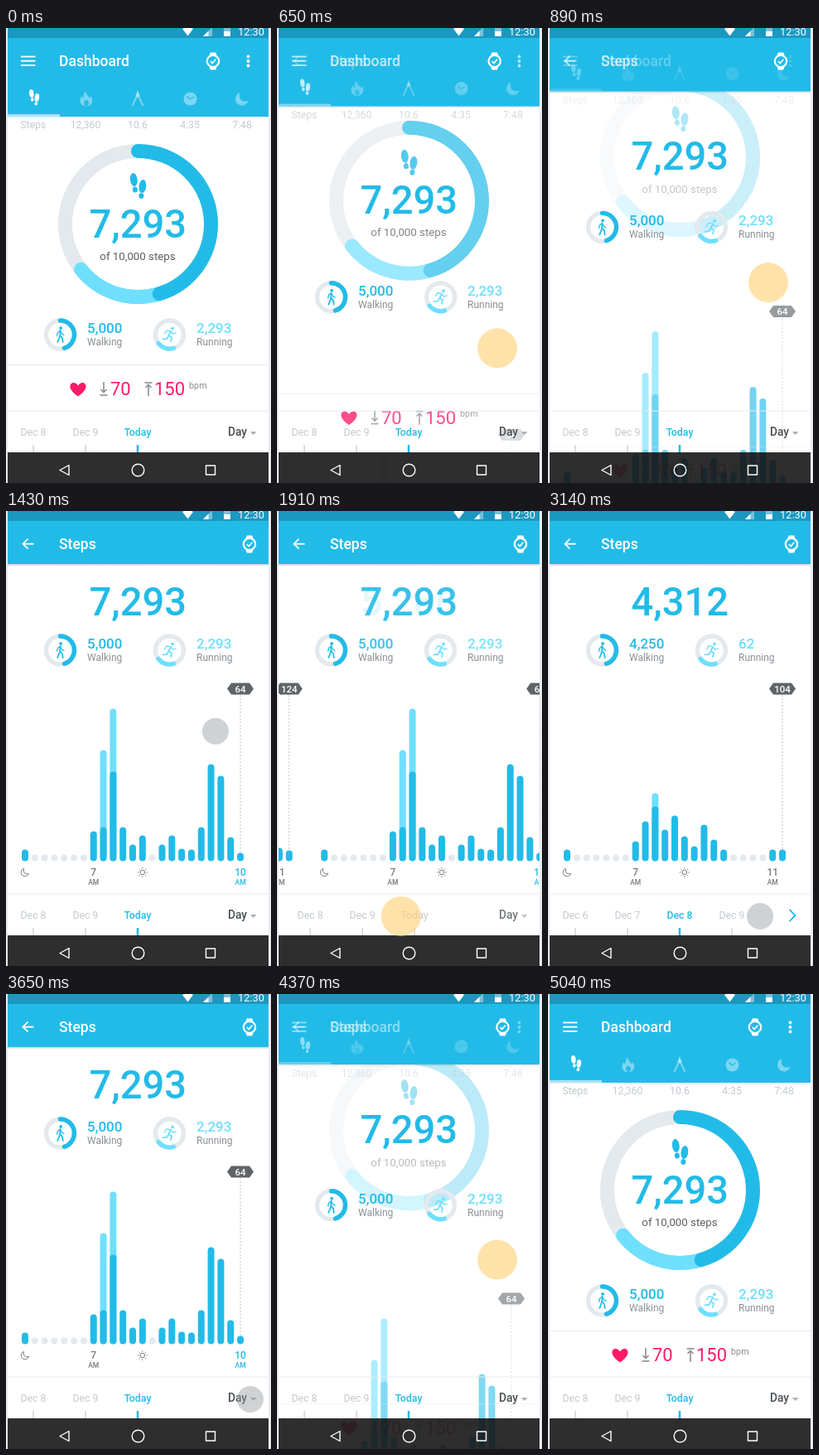
These frames come from a looping animation (320x549 px, 5600 ms). An HTML page with a canvas:

```html
<!DOCTYPE html>
<html lang="en">
<head>
<meta charset="utf-8">
<title>Step tracker</title>
<style>
html, body { margin: 0; width: 100%; height: 100%; overflow: hidden; background: #e9ecf0; }
canvas { display: block; width: 320px; height: 549px; }
</style>
</head>
<body>
<canvas id="stage"></canvas>
<script>
const W = 320, H = 549, LOOP = 5600;
const BLUE = '#22bbe8', LIGHT = '#6fdffe', TRACK = '#e4e9ee', GREY = '#c4c9cf', TEXT = '#5a5f64', PINK = '#ff1a66';
const canvas = document.getElementById('stage');
const c = canvas.getContext('2d');
const dpr = window.devicePixelRatio || 1;
canvas.width = W * dpr;
canvas.height = H * dpr;

// Timelines: time, value, time, value ...
const OPEN = [522, 0, 1097, 1, 4124, 1, 4699, 0];
const HEAD = [485, 0, 1060, 1, 4090, 1, 4665, 0];
const DAYS_BACK = [1879, 0, 2446, 2, 3290, 2, 3640, 0];
const TOUCH_X = [1400, 266, 1690, 144, 1879, 144, 2446, 246, 3110, 246, 3260, 295, 3920, 295, 4090, 266];
const TOUCH_Y = [522, 429, 1097, 239, 1400, 239, 1690, 489, 3920, 489, 4090, 239, 4124, 239, 4699, 429];
const PRESS = [400, 0, 500, 1, 1010, 1, 1100, 0, 1640, 0, 1740, 1, 2450, 1, 2510, 0,
  3240, 0, 3320, 1, 3560, 1, 3650, 0, 4050, 0, 4130, 1, 4700, 1, 4800, 0];
const TOUCH_FADE = [130, 0, 300, 1, 4800, 1, 5040, 0];

// Bar heights per day, 0 is a dot; "extra" is the full height with the light part.
const DAYS = [
  { steps: '7,293', walk: '5,000', run: '2,293', peak: '64', hour: '10', hourBar: 22, extra: { 8: 134, 9: 184 },
    bars: [14, 0, 0, 0, 0, 0, 0, 36, 41, 108, 41, 20, 31, 0, 20, 31, 15, 14, 41, 117, 103, 29, 10] },
  { steps: '5,286', walk: '5,250', run: '36', peak: '124', hour: '11', hourBar: 21, extra: { 8: 72 },
    bars: [14, 14, 0, 0, 0, 0, 0, 28, 60, 80, 59, 41, 67, 33, 12, 16, 51, 14, 72, 40, 25, 16, 13] },
  { steps: '4,312', walk: '4,250', run: '62', peak: '104', hour: '11', hourBar: 21, extra: { 9: 82 },
    bars: [14, 0, 0, 0, 0, 0, 0, 24, 48, 66, 38, 55, 30, 18, 44, 26, 14, 0, 0, 0, 0, 14, 14] }
];
const DATES = ['Today', 'Dec 9', 'Dec 8', 'Dec 7', 'Dec 6'];

const clamp = v => Math.max(0, Math.min(1, v));
const mix = (a, b, k) => a + (b - a) * k;

function track(t, k) {
  if (t <= k[0]) return k[1];
  for (let i = 2; i < k.length; i += 2) {
    if (t < k[i]) return mix(k[i - 1], k[i + 1], (t - k[i - 2]) / (k[i] - k[i - 2]));
  }
  return k[k.length - 1];
}

function layer(alpha, dx, dy, draw) {
  if (alpha <= 0) return;
  c.save();
  c.globalAlpha *= clamp(alpha);
  c.translate(dx, dy);
  draw();
  c.restore();
}

function text(s, x, y, size, color, weight = 400, align = 'center') {
  c.font = `${weight} ${size}px Roboto, "Open Sans", sans-serif`;
  c.textAlign = align;
  c.fillStyle = color;
  c.fillText(s, x, y);
}

function rect(x, y, w, h, color) {
  c.fillStyle = color;
  c.fillRect(x, y, w, h);
}

function line(pts, color, width, cap = 'butt', close = false) {
  c.beginPath();
  for (let i = 0; i < pts.length; i += 2) c.lineTo(pts[i], pts[i + 1]);
  if (close) c.closePath();
  c.lineCap = cap;
  c.lineJoin = cap === 'round' ? 'round' : 'miter';
  c.lineWidth = width;
  c.strokeStyle = color;
  c.stroke();
}

function poly(pts, color) {
  c.beginPath();
  for (let i = 0; i < pts.length; i += 2) c.lineTo(pts[i], pts[i + 1]);
  c.fillStyle = color;
  c.fill();
}

function disc(x, y, rx, color, ry = rx, rot = 0) {
  c.beginPath();
  c.ellipse(x, y, rx, ry, rot, 0, 7);
  c.fillStyle = color;
  c.fill();
}

// Arc in degrees, clockwise from the top
function arc(x, y, r, from, to, color, width, cap = 'butt') {
  c.beginPath();
  c.arc(x, y, r, (from - 90) * Math.PI / 180, (to - 90) * Math.PI / 180);
  c.lineCap = cap;
  c.lineWidth = width;
  c.strokeStyle = color;
  c.stroke();
}

// Veil of white that fades everything drawn so far between two heights
function veil(alpha, top, bottom) {
  layer(alpha, 0, 0, () => rect(2, top, 315, bottom - top, '#fff'));
}

function moonPath(x, y, r) {
  c.beginPath();
  c.arc(x, y, r, -1.92, 0.35, true);
  c.quadraticCurveTo(x - .6 * r, y + .6 * r, x - .34 * r, y - .94 * r);
  c.closePath();
}

function feet(x, y, s, color) {
  c.save();
  c.translate(x, y);
  c.scale(s, s);
  disc(-5.2, -7, 4.4, color, 8, -.12);
  disc(-3.6, 5, 3, color, 3.6, -.15);
  disc(5.4, 1, 4.4, color, 8, .12);
  disc(3.9, 12.5, 3, color, 3.4, .15);
  c.restore();
}

function watch(x, y) {
  arc(x, y, 7.2, 0, 360, '#fff', 2.2);
  poly([x - 4.5, y - 7, x - 3.2, y - 10.5, x + 3.2, y - 10.5, x + 4.5, y - 7], '#fff');
  poly([x - 4.5, y + 7, x - 3.2, y + 10.5, x + 3.2, y + 10.5, x + 4.5, y + 7], '#fff');
  line([x - 3.2, y, x - .8, y + 2.5, x + 3.4, y - 2.2], '#fff', 1.7);
}

function walker(x, y) {
  disc(x + .6, y - 8, 1.9, BLUE);
  line([x, y - 5, x - .3, y + 1, x + 2.5, y + 4, x + 3.2, y + 9], BLUE, 1.8, 'round');
  line([x - .3, y + 1, x - 1.6, y + 5, x - 3.2, y + 9], BLUE, 1.8, 'round');
  line([x - 4, y + 1, x - 2.8, y - 3, x, y - 4.6, x + 2, y - 1, x + 4.3, y + .4], BLUE, 1.4, 'round');
}

function runner(x, y) {
  disc(x + 3.6, y - 7.5, 1.9, LIGHT);
  line([x + 1.6, y - 4, x - 1, y + 1, x + 2.6, y + 3.6, x + 1.4, y + 8], LIGHT, 1.8, 'round');
  line([x - 1, y + 1, x - 3.2, y + 5, x - 8, y + 5.4], LIGHT, 1.8, 'round');
  line([x - 6, y - 1.2, x - 3.6, y - 5, x + 1.4, y - 4.4, x + 4, y - .8, x + 7.6, y - 1.8], LIGHT, 1.4, 'round');
}

function ring(p) {
  const dy = -126 * p;
  layer(1, 0, dy, () => {
    arc(159.5, 236.5, 88, 0, 360, TRACK, 17);
    arc(159.5, 236.5, 88, 163, 231.6, LIGHT, 17, 'round');
    arc(159.5, 236.5, 88, 0, 163, BLUE, 17, 'round');
  });
  veil(1 - (1 - p) ** 1.4, 0, 335 + dy);
  layer(1 - p, 0, dy, () => {
    feet(159.5, 190, 1, BLUE);
    text('of 10,000 steps', 159, 279.5, 13.3, TEXT);
  });
}

function counters(p, d) {
  const top = mix(252.5, 126.2, p);
  const y = mix(0, -202, p);
  DAYS.forEach((day, i) => layer(1 - Math.abs(d - i), 0, 0, () => {
    text(day.steps, 159.3, top, 47.2, BLUE, 500);
    text(day.walk, 98, 368 + y, 17, BLUE, 500, 'left');
    text(day.run, 230, 368 + y, 17, LIGHT, 500, 'left');
  }));
  layer(1, 0, y, () => {
    text('Walking', 98, 383, 12, '#8a8f94', 400, 'left');
    text('Running', 230, 383, 12, '#8a8f94', 400, 'left');
    arc(65.5, 370, 17, 0, 360, TRACK, 5.4);
    arc(65.5, 370, 17, 0, 163, BLUE, 5.4, 'round');
    arc(197.5, 370, 17, 0, 360, TRACK, 5.4);
    arc(197.5, 370, 17, 163, 232, LIGHT, 5.4, 'round');
    walker(65.5, 370);
    runner(197.5, 370);
  });
}

function heartRow() {
  rect(2, 406, 315, 1, '#e8ebee');
  c.beginPath();
  c.moveTo(87, 444.5);
  c.bezierCurveTo(72, 434, 78, 427, 82.5, 428);
  c.quadraticCurveTo(85.5, 428.5, 87, 431.5);
  c.quadraticCurveTo(88.5, 428.5, 91.5, 428);
  c.bezierCurveTo(96, 427, 102, 434, 87, 444.5);
  c.fillStyle = PINK;
  c.fill();
  const grey = '#8a8f94';
  line([118, 427, 118, 439], grey, 1.6);
  line([114.5, 436, 118, 439.5, 121.5, 436], grey, 1.6);
  line([113.5, 443, 122.5, 443], grey, 1.6);
  line([172, 431, 172, 444], grey, 1.6);
  line([168.5, 434, 172, 430.5, 175.5, 434], grey, 1.6);
  line([167.5, 428, 176.5, 428], grey, 1.6);
  text('70', 126, 443, 22, PINK, 400, 'left');
  text('150', 179, 443, 22, PINK, 400, 'left');
  text('bpm', 221, 434.5, 10.8, '#8a8f94', 400, 'left');
}

function bar(x, h, color) {
  c.beginPath();
  c.roundRect(x - 4, 422.5 - h, 8, h, 4);
  c.fillStyle = color;
  c.fill();
}

function sun(x, y) {
  arc(x, y, 2.8, 0, 360, '#777c81', 1);
  for (let i = 0; i < 8; i++) {
    const a = i * Math.PI / 4, u = Math.cos(a), v = Math.sin(a);
    line([x + u * 4.4, y + v * 4.4, x + u * 6, y + v * 6], '#777c81', 1);
  }
}

function hour(s, x, color) {
  text(s, x, 440, 12, color, 500);
  text('AM', x, 450.5, 8.5, color, 500);
}

function chart(d) {
  const step = 11.82;
  DAYS.forEach((day, i) => {
    const x0 = 23 + (d - i) * 302.5;
    if (x0 > 340 || x0 < -310) return;
    const end = x0 + 22 * step;
    c.setLineDash([2, 2]);
    line([end, 222, end, 412], '#c0c4c9', 1);
    c.setLineDash([]);
    day.bars.forEach((h, n) => {
      const x = x0 + n * step;
      if (day.extra[n]) bar(x, day.extra[n], LIGHT);
      if (h) bar(x, h, BLUE);
      else disc(x, 418.5, 4, TRACK);
    });
    poly([end - 16, 214.5, end - 11, 207.5, end + 11, 207.5, end + 16, 214.5, end + 11, 221.5, end - 11, 221.5], '#5f6468');
    text(day.peak, end, 218.6, 11.5, '#fff', 500);
    moonPath(x0, 436, 4.8);
    c.lineWidth = 1;
    c.strokeStyle = '#777c81';
    c.stroke();
    hour('7', x0 + 7 * step, '#777c81');
    sun(x0 + 12 * step, 436);
    hour(day.hour, x0 + day.hourBar * step, i ? '#777c81' : BLUE);
  });
}

function dates(d) {
  rect(2, 461.5, 315, 1, '#e8ebee');
  DATES.forEach((s, i) => {
    const x = 159 + 63 * (d - i);
    if (x < -30 || x > 300) return;
    const near = clamp(1 - Math.abs(x - 159) / 7);
    layer(1 - near, 0, 0, () => {
      text(s, x, 492, 12.3, GREY);
      rect(x - .75, 503, 1.5, 10, '#cfd3d8');
    });
    layer(near, 0, 0, () => {
      text(s, x, 492, 12.3, BLUE, 500);
      rect(x - 1.25, 503, 2.5, 10, BLUE);
    });
  });
  layer(2 * d, 0, 0, () => {
    const g = c.createLinearGradient(230, 0, 275, 0);
    g.addColorStop(0, 'rgba(255,255,255,0)');
    g.addColorStop(1, '#fff');
    rect(230, 470, 87, 43, g);
  });
  layer(1 - 2 * d, 0, 0, () => {
    text('Day', 279.5, 492, 13.8, '#4a4f54', 500);
    poly([295, 487, 302.5, 487, 298.7, 491], '#aab0b6');
  });
  layer(2 * d - 1, 0, 0, () => line([291.5, 481, 298.5, 488, 291.5, 495], BLUE, 1.8));
}

function tabs() {
  feet(34, 83.3, .62, '#fff');
  rect(2, 104, 63, 3, '#a9e2f5');
  layer(.4, 0, 0, () => {
    c.beginPath();
    c.moveTo(96, 76.5);
    c.bezierCurveTo(97, 81, 100, 82, 101, 85);
    c.lineTo(102.3, 82);
    c.bezierCurveTo(106, 87, 104.5, 94, 97, 94.3);
    c.bezierCurveTo(89, 94, 87.5, 87, 91.5, 82);
    c.quadraticCurveTo(92, 84.5, 93.6, 85);
    c.quadraticCurveTo(93, 80, 96, 76.5);
    c.fillStyle = '#fff';
    c.fill();
    line([152.5, 94, 159, 80, 165.5, 94], '#fff', 2);
    line([159, 76, 159, 80], '#fff', 2);
    disc(159, 81, 2.5, '#fff');
    disc(222.5, 85.5, 8, '#fff');
    moonPath(285, 85.5, 8);
    c.fillStyle = '#fff';
    c.fill();
  });
  disc(97, 90.5, 2.8, BLUE, 3.4);
  line([218.5, 82.5, 222, 86, 227, 83.3], BLUE, 1.3);
}

function header(q) {
  const bottom = mix(107, 64, q);
  layer(1 - q, 0, -42 * q, () => {
    ['Steps', '12,360', '10.6', '4:35', '7:48'].forEach((s, i) => text(s, 33 + 63 * i, 121, 12.2, GREY));
  });
  const g = c.createLinearGradient(0, bottom, 0, bottom + 3);
  g.addColorStop(0, 'rgba(0,40,60,.2)');
  g.addColorStop(1, 'rgba(0,40,60,0)');
  layer(.3 + .7 * q, 0, 0, () => rect(2, bottom, 315, 3, g));
  rect(2, 0, 315, bottom, BLUE);
  c.save();
  c.beginPath();
  c.rect(2, 12, 315, bottom - 12);
  c.clip();
  layer(1 - q, 0, -43 * q, tabs);
  c.restore();
  layer(1 - q, 0, 0, () => {
    [34.5, 39.7, 45].forEach(y => rect(18, y - .9, 17.5, 1.8, '#fff'));
    text('Dashboard', 64, 46, 17.5, '#fff', 500, 'left');
  });
  layer(1 - 1.2 * q, 0, 0, () => [34.5, 40, 45.5].forEach(y => disc(292.5, y, 1.9, '#fff')));
  layer(q, 0, 0, () => {
    line([33.5, 39.7, 20.5, 39.7], '#fff', 1.8);
    line([26.5, 33.7, 20.5, 39.7, 26.5, 45.7], '#fff', 1.8);
    text('Steps', 64, 46, 17.5, '#fff', 500, 'left');
  });
  watch(mix(250, 294, q), 40);
  rect(2, 0, 315, 12, '#1b98c0');
  poly([213, 1, 219.5, 9.5, 226, 1, 224, 0, 215, 0], '#fff');
  layer(.4, 0, 0, () => poly([238, 10, 249, 10, 249, 0, 248, 0], '#fff'));
  poly([238, 10, 244.5, 10, 244.5, 3.5], '#fff');
  layer(.4, 0, 0, () => rect(263, 0, 8, 4, '#fff'));
  rect(263, 4, 8, 6, '#fff');
  text('12:30', 296, 9, 12.8, '#fff');
}

function navBar() {
  rect(2, 512, 315, 37, 'rgba(10,10,10,.85)');
  line([65, 533.5, 76, 527.5, 76, 539.5], '#fff', 1.4, 'round', true);
  arc(159.5, 533.5, 7.3, 0, 360, '#fff', 1.4);
  c.strokeRect(241.5, 528, 11, 11);
}

function touch(t) {
  const k = track(t, PRESS);
  const rgb = [[150, 255], [156, 209], [160, 118]].map(([a, b]) => Math.round(mix(a, b, k)));
  layer(track(t, TOUCH_FADE), 0, 0, () =>
    disc(track(t, TOUCH_X), track(t, TOUCH_Y), 16 + 8 * k, `rgba(${rgb},${mix(.45, .62, k)})`));
}

function draw(t) {
  const p = track(t, OPEN), q = track(t, HEAD), d = track(t, DAYS_BACK);
  c.setTransform(dpr, 0, 0, dpr, 0, 0);
  rect(0, 0, W, H, '#e9ecf0');
  rect(2, 0, 315, H, '#fff');
  c.save();
  c.beginPath();
  c.rect(2, 0, 315, H);
  c.clip();
  layer(p > 0 ? 1 : 0, 0, 356 * (1 - p), () => chart(d));
  veil(1 - p, 0, H);
  if (p < 1) ring(p);
  layer(1 - p, 0, 154 * p, heartRow);
  counters(p, d);
  dates(d);
  header(q);
  navBar();
  touch(t);
  c.restore();
}

const start = performance.now();
function tick() {
  draw((performance.now() - start) % LOOP);
  requestAnimationFrame(tick);
}
tick();
</script>
</body>
</html>
```
